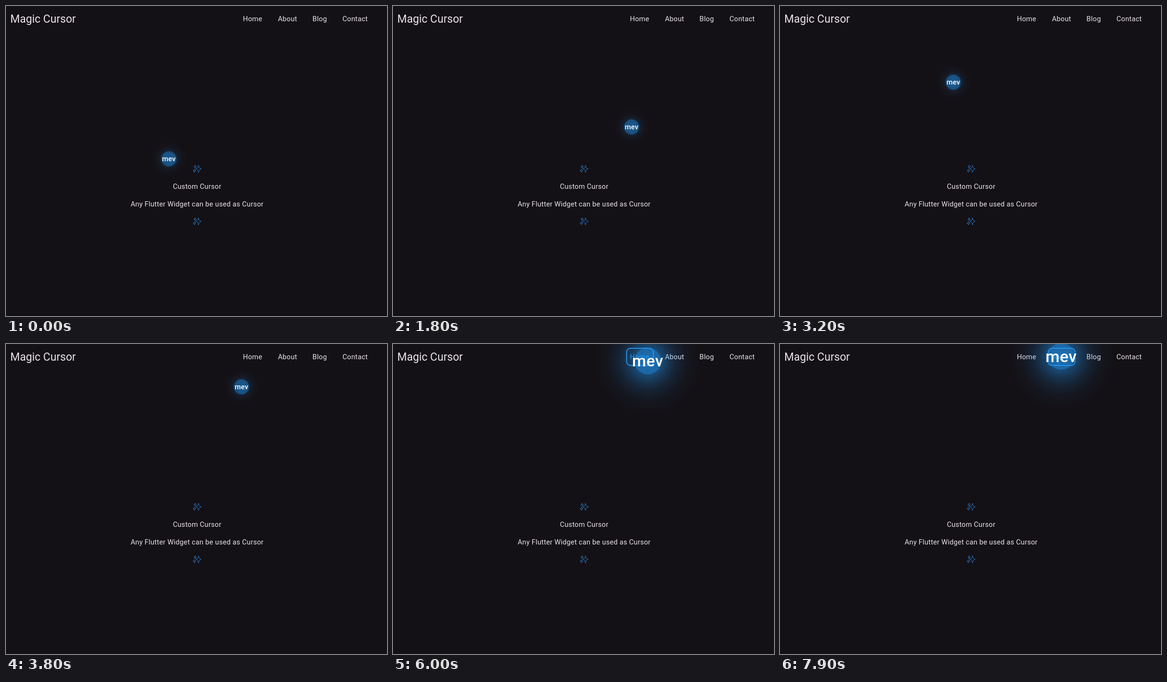
These frames come from a looping animation (800x651 px, 8000 ms). An HTML page:

```html
<!DOCTYPE html>
<html lang="en">
<head>
<meta charset="utf-8">
<title>Magic Cursor</title>
<style>
  html, body { margin: 0; width: 100%; height: 100%; overflow: hidden; background: #141116; }
  svg { display: block; width: 100%; height: 100%; }
  text { font: 400 14.7px Roboto, sans-serif; letter-spacing: .26px; fill: #e8e3e9; }
  .title { font-size: 23.1px; letter-spacing: 0; }
  .middle { text-anchor: middle; }
  .frame { fill: none; stroke: #2b90e2; stroke-width: 2; opacity: 0; }
  .sparkle { fill: none; stroke: #2d7ccb; stroke-width: 1; stroke-linejoin: round; }
  #label { font-weight: 500; fill: #fff; }
</style>
</head>
<body>
<svg viewBox="0 0 800 651">
  <defs>
    <radialGradient id="halo">
      <stop offset="0" stop-color="#2196f3" stop-opacity=".55"/>
      <stop offset=".25" stop-color="#2196f3" stop-opacity=".43"/>
      <stop offset=".4" stop-color="#2196f3" stop-opacity=".26"/>
      <stop offset=".55" stop-color="#2196f3" stop-opacity=".13"/>
      <stop offset=".75" stop-color="#2196f3" stop-opacity=".04"/>
      <stop offset="1" stop-color="#2196f3" stop-opacity="0"/>
    </radialGradient>
    <g id="sparkles" class="sparkle">
      <path d="M3.2-7.5Q4-.8 9 0Q4 .8 3.2 7.5Q2.4 .8-2.6 0Q2.4-.8 3.2-7.5Z"/>
      <path d="M-3.8-7.6Q-3.4-4.8-1-4.4Q-3.4-4-3.8-1.2Q-4.2-4-6.6-4.4Q-4.2-4.8-3.8-7.6Z"/>
      <path d="M-5.3 .6Q-4.9 3.4-2.3 3.9Q-4.9 4.4-5.3 7.2Q-5.7 4.4-8.3 3.9Q-5.7 3.4-5.3 .6Z"/>
    </g>
  </defs>

  <text class="title" x="9" y="34.5">Magic Cursor</text>
  <text id="home" x="497.5" y="32">Home</text>
  <text id="about" x="571" y="32">About</text>
  <text x="643.5" y="32">Blog</text>
  <text x="706.5" y="32">Contact</text>
  <rect id="homeFrame" class="frame" x="490.5" y="9" width="56" height="36" rx="8"/>
  <rect id="aboutFrame" class="frame" x="563" y="9" width="56.5" height="36" rx="8"/>

  <use href="#sparkles" x="401" y="342"/>
  <text class="middle" x="401.3" y="384">Custom Cursor</text>
  <text class="middle" x="401.3" y="421">Any Flutter Widget can be used as Cursor</text>
  <use href="#sparkles" x="401" y="452.3"/>

  <g id="cursor">
    <circle id="glow" fill="url(#halo)"/>
    <circle id="disc" fill="#2196f3" fill-opacity=".36"/>
    <text id="label" class="middle" y="5">mev</text>
  </g>
</svg>
<script>
  const LOOP = 8000, TICK = 100, GROW = 450;

  // Pointer path: time, x, y
  const path = [
    [1300, 342, 321], [1600, 430, 285], [1800, 501, 254], [2100, 519, 214],
    [2400, 450, 190], [2700, 347.5, 172], [3000, 272, 166], [3300, 420, 155],
    [3500, 500, 135], [3800, 494.5, 90], [4200, 501, 70], [4500, 512, 46],
    [4800, 520.5, 40], [5900, 530, 37], [6200, 549, 33], [6700, 562, 29.5],
    [7100, 580, 27], [7400, 590.5, 26]
  ];
  const links = [
    { id: 'home', enter: 4500, leave: 6200 },
    { id: 'about', enter: 6750, leave: LOOP }
  ];

  const $ = id => document.getElementById(id);
  const clamp = v => Math.min(1, Math.max(0, v));
  const mix = (a, b, p) => a + (b - a) * p;

  function slope(i, axis) {
    const before = path[i - 1], after = path[i + 1];
    return before && after ? (after[axis] - before[axis]) / (after[0] - before[0]) : 0;
  }

  // Cubic Hermite curve through the path points
  function position(t, axis) {
    const last = path.length - 1;
    if (t <= path[0][0]) return path[0][axis];
    if (t >= path[last][0]) return path[last][axis];
    const i = path.findIndex(point => point[0] > t) - 1;
    const a = path[i], b = path[i + 1], span = b[0] - a[0];
    const u = (t - a[0]) / span, v = 1 - u;
    return a[axis] * (1 + 2 * u) * v * v + b[axis] * u * u * (3 - 2 * u)
      + span * u * v * (slope(i, axis) * v - slope(i + 1, axis) * u);
  }

  function draw(now) {
    const t = Math.floor((now % LOOP) / TICK) * TICK;
    let hover = 0;
    for (const { id, enter, leave } of links) {
      const p = clamp((t - enter) / GROW) - clamp((t - leave) / GROW);
      hover = Math.max(hover, p);
      $(id).style.fill = `rgb(${mix(232, 33, p)}, ${mix(227, 150, p)}, ${mix(233, 243, p)})`;
      $(id + 'Frame').style.opacity = clamp(p * 3);
    }
    const size = clamp(hover / .6);
    $('cursor').setAttribute('transform', `translate(${position(t, 1)} ${position(t, 2)})`);
    $('disc').setAttribute('r', mix(16, 28, size));
    $('glow').setAttribute('r', mix(38, 112, size));
    $('glow').setAttribute('opacity', mix(.55, 1, size));
    $('label').setAttribute('transform', `scale(${mix(1, 2.3, hover)})`);
  }

  const start = performance.now();
  function play() {
    draw(performance.now() - start);
    requestAnimationFrame(play);
  }
  play();
</script>
</body>
</html>
```
